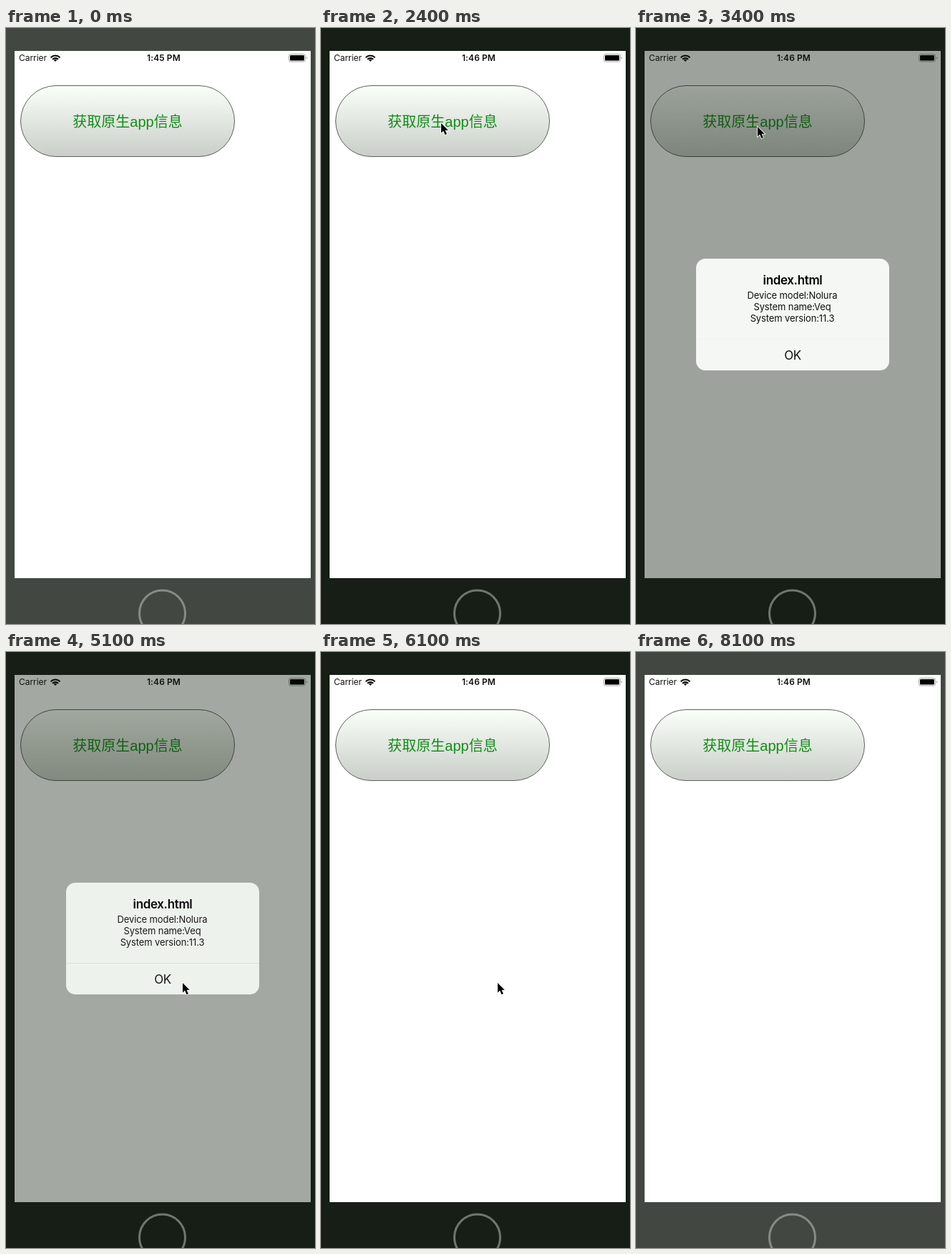
An HTML page that plays this animation: 432 px wide and 832 px high, repeating every 8.2 s.

```html
<!DOCTYPE html>
<html lang="zh">
<head>
<meta charset="utf-8">
<title>App info dialog</title>
<style>
  html, body { margin: 0; width: 100%; height: 100%; overflow: hidden; background: #161e15; }
  svg { display: block; width: 432px; height: 832px; }
  text { font-family: Inter, "Open Sans", sans-serif; font-size: 12px; fill: #111; }
  .mid { text-anchor: middle; }
  .bold { font-weight: 600; }
  .label { font: 20px "Liberation Sans", "Noto Sans CJK SC", "Noto Sans CJK", sans-serif; fill: #128c16; }
  .title { font-size: 17px; letter-spacing: -.35px; fill: #000; }
  .msg { font-size: 13px; letter-spacing: -.12px; }
  .ok { font-size: 17px; letter-spacing: -.4px; }
</style>
</head>
<body>
<svg viewBox="0 0 432 832">
  <defs>
    <linearGradient id="silver" x2="0" y2="1">
      <stop stop-color="#fbfffa"/>
      <stop offset="1" stop-color="#c9cec8"/>
    </linearGradient>
  </defs>
  <rect id="bezel" width="432" height="832"/>
  <circle id="home" cx="218.5" cy="817" r="32" fill="none" stroke-width="3"/>
  <rect x="12" y="32" width="414" height="736" fill="#fff"/>

  <text x="18" y="46.3" letter-spacing="-.05">Carrier</text>
  <g fill="none" stroke="#000" stroke-width="2.1">
    <path d="M62.6 41.2a9 9 0 0 1 12.8 0M65 43.8a5.6 5.6 0 0 1 8 0"/>
    <path d="M69 47l-2.2-2.3a3.2 3.2 0 0 1 4.4 0z" fill="#000" stroke="none"/>
  </g>
  <text id="clock" class="mid bold" x="220.5" y="46.3" letter-spacing=".1"></text>
  <rect x="395.5" y="36.5" width="23" height="10.5" rx="2.5" fill="none" stroke="#a4a8a3"/>
  <rect x="397" y="38" width="20" height="7.5" rx="1.2"/>
  <path d="M420 40v3.6q1.3-.5 1.3-1.8t-1.3-1.8" fill="#a4a8a3"/>

  <rect x="20.5" y="80.5" width="299" height="99" rx="49.5" fill="url(#silver)" stroke="#5c625b"/>
  <text class="label mid" x="170" y="137.5">获取原生app信息</text>
  <rect id="tap" x="17" y="77" width="306" height="106" rx="53" fill="#1a1a1a" fill-opacity=".3"/>

  <rect id="dim" x="12" y="32" width="414" height="736" fill="#0d180a"/>
  <g id="alert">
    <rect x="84" y="322" width="270" height="156" rx="13" fill="#f4f7f3"/>
    <text class="title mid bold" x="219" y="357.8">index.html</text>
    <text class="msg mid" x="218.5" y="378">Device model:Nolura</text>
    <text class="msg mid" x="218.5" y="394">System name:Veq</text>
    <text class="msg mid" x="218.5" y="410">System version:11.3</text>
    <path id="rule" d="M84 434.5h270"/>
    <text id="ok" class="ok mid" x="219" y="462.5">OK</text>
  </g>
  <path id="cursor" d="M0 0v13.5l3.1-2.9 2.3 5.4 2.5-1.1-2.3-5.2h4.2z"
        stroke="#fff" stroke-width="1.6" paint-order="stroke"/>
</svg>
<script>
const LOOP = 8200, STEP = 100;
const el = id => document.getElementById(id);
const set = (id, attrs) => {
  for (const k in attrs) el(id).setAttribute(k, attrs[k]);
};
const clamp = v => Math.min(1, Math.max(0, v));
const easeOut = u => 1 - (1 - u) ** 3;
const easeInOut = u => u < .5 ? 4 * u ** 3 : 1 - 4 * (1 - u) ** 3;

// pointer stops: time, x, y
const path = [
  [400, 266, 362], [900, 266, 362], [1000, 250, 339], [1500, 168, 127], [1600, 168, 133],
  [3200, 168, 133], [3400, 170, 138], [4100, 246, 490], [4300, 247, 462], [LOOP, 247, 462]
];

function pointer(t) {
  const i = Math.max(1, path.findIndex(p => p[0] >= t));
  const [t0, x0, y0] = path[i - 1], [t1, x1, y1] = path[i];
  const u = clamp((t - t0) / (t1 - t0));
  return [x0 + (x1 - x0) * u, y0 + (y1 - y0) * u];
}

function draw(t) {
  const active = t >= 400 && t < 7200;
  set('bezel', { fill: active ? '#161e15' : '#424841' });
  set('home', { stroke: active ? '#70766f' : '#868c85' });
  el('clock').textContent = t < 2300 ? '1:45 PM' : '1:46 PM';
  set('tap', { opacity: t >= 2300 && t < 2400 ? 1 : 0 });

  const shown = easeOut(clamp((t - 2500) / 500));
  const alpha = shown * (1 - easeInOut(clamp((t - 5000) / 400)));
  const scale = 1.2 - .2 * shown;
  set('dim', { opacity: .4 * alpha });
  set('alert', {
    opacity: alpha,
    transform: `translate(219 400) scale(${scale}) translate(-219 -400)`
  });
  const settled = t >= 4400;
  set('ok', { fill: settled ? '#1e90ea' : '#7a9fa4' });
  set('rule', { stroke: settled ? '#e1e4e0' : '#eff2ee' });

  set('cursor', { opacity: active ? 1 : 0, transform: `translate(${pointer(t)})` });
}

const start = performance.now();
function tick() {
  const t = (performance.now() - start) % LOOP;
  draw(Math.floor(t / STEP) * STEP);
  requestAnimationFrame(tick);
}
tick();
</script>
</body>
</html>
```
